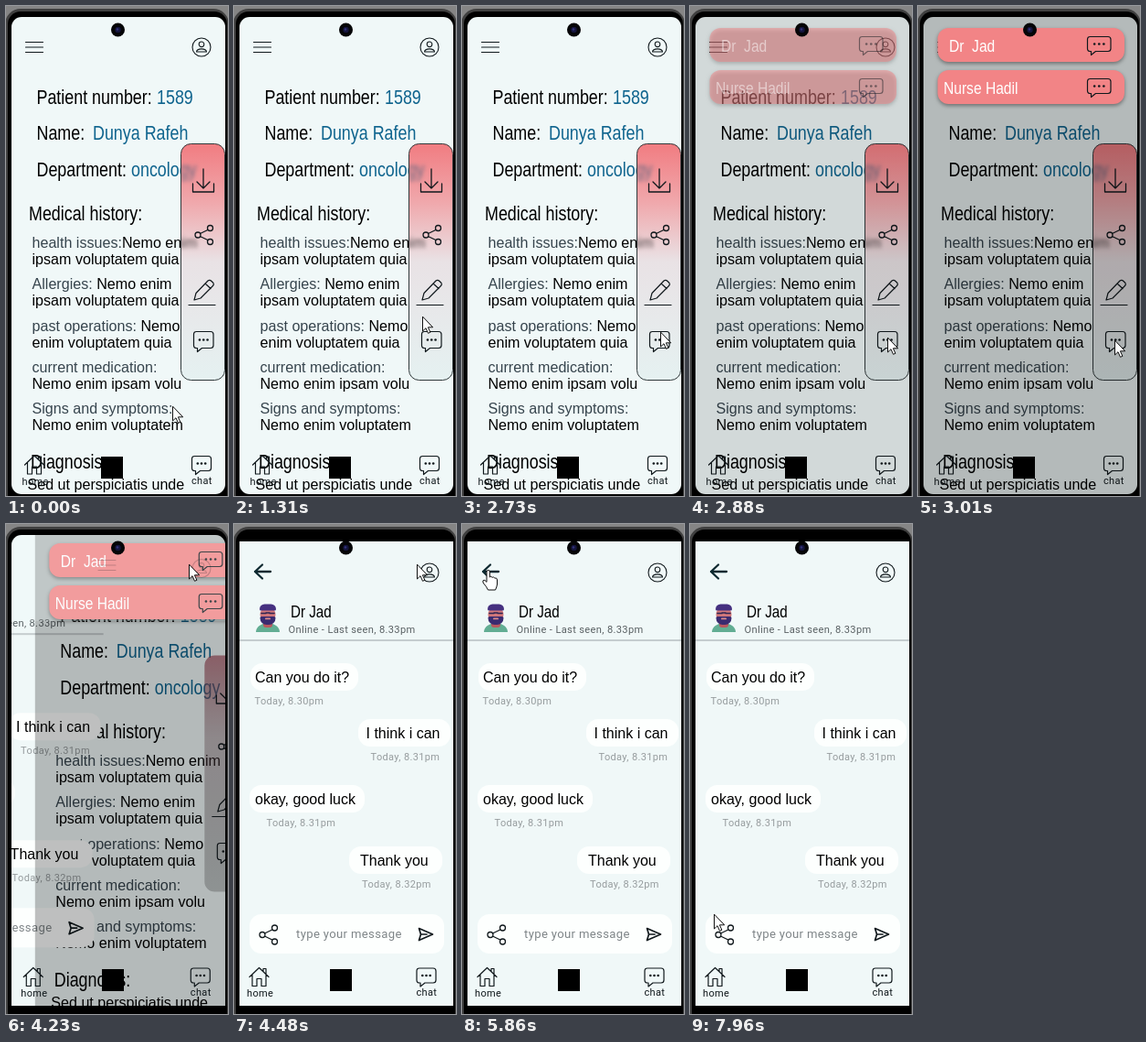
Animation, 243 px wide and 535 px high, one loop 8 s. Source, as an HTML page with a canvas:

```html
<!DOCTYPE html>
<html lang="en">
<head>
<meta charset="utf-8">
<title>Patient record and chat</title>
<style>
  html, body { margin: 0; width: 100%; height: 100%; overflow: hidden; background: #858585; }
  canvas { display: block; }
</style>
</head>
<body>
<canvas id="stage" width="243" height="535"></canvas>
<script>
const ctx = document.getElementById('stage').getContext('2d');
const LOOP = 8000;
const BG = '#f0f8f8', INK = '#10181c', BLUE = '#0f648e', SLATE = '#36444d', GREY = '#969c9e', PINK = '#f28486';

const FACES = {
  body: { family: '"Liberation Sans", Arial, sans-serif', scale: 1, spacing: 0 },
  narrow: { family: '"Liberation Sans", Arial, sans-serif', scale: 0.82, spacing: 0 },
  light: { family: 'Roboto, sans-serif', scale: 1, spacing: 0.35 }
};

function text(str, x, y, size, color = '#000', face = 'body') {
  const f = FACES[face];
  ctx.save();
  ctx.translate(x, y);
  ctx.scale(f.scale, 1);
  ctx.font = `${size}px ${f.family}`;
  ctx.letterSpacing = f.spacing + 'px';
  ctx.fillStyle = color;
  ctx.fillText(str, 0, 0);
  ctx.restore();
}

function box(x, y, w, h, r, fill) {
  ctx.beginPath();
  ctx.roundRect(x, y, w, h, r);
  if (fill) { ctx.fillStyle = fill; ctx.fill(); }
}

function disc(x, y, rx, ry, fill) {
  ctx.beginPath();
  ctx.ellipse(x, y, rx, ry, 0, 0, Math.PI * 2);
  ctx.fillStyle = fill;
  ctx.fill();
}

function stroke(d, x = 0, y = 0, width = 1.3, color = INK, fill) {
  ctx.save();
  ctx.translate(x, y);
  const path = new Path2D(d);
  if (fill) { ctx.fillStyle = fill; ctx.fill(path); }
  ctx.strokeStyle = color;
  ctx.lineWidth = width;
  ctx.lineJoin = ctx.lineCap = 'round';
  ctx.stroke(path);
  ctx.restore();
}

function fade(y, h, ...stops) {
  const g = ctx.createLinearGradient(0, y, 0, y + h);
  stops.forEach(([at, color]) => g.addColorStop(at, color));
  return g;
}

// Icons
function speech(x, y, w, h) {
  const b = h - 4;
  stroke(`M3 0H${w - 3}Q${w} 0 ${w} 3V${b - 3}Q${w} ${b} ${w - 3} ${b}H9L4 ${h}V${b}H3Q0 ${b} 0 ${b - 3}V3Q0 0 3 0Z`, x, y, 1.2);
  for (const k of [-1, 0, 1]) disc(x + w / 2 + k * w * 0.2, y + b / 2, 1.3, 1.3, INK);
}

function share(x, y, rise) {
  const ring = (cx, cy) => `M${cx + 3} ${cy}A3 3 0 1 1 ${cx - 3} ${cy}A3 3 0 1 1 ${cx + 3} ${cy}`;
  const r = rise - 2;
  stroke(ring(-6.5, 0) + ring(7, -rise) + ring(7, rise) + `M-4 -1.5L4.3 ${-r}M-4 1.5L4.3 ${r}`, x, y);
}

function person(x, y) {
  stroke('M10 0A10 10 0 1 1 -10 0A10 10 0 1 1 10 0M2.8 -3.2A2.8 2.8 0 1 1 -2.8 -3.2A2.8 2.8 0 1 1 2.8 -3.2M-5.5 5C-5 0.8 5 0.8 5.5 5Z', x, y, 1.1);
}

function menu(x, y) {
  stroke('M0 0H19M0 5.5H19M0 11H19', x, y, 1.1);
}

function nav(dx, dy) {
  ctx.save();
  ctx.translate(dx, dy);
  stroke('M0 10L10.5 0L21 10M3 8V20H8V12H13V20H18V8M15 4V1H18V7', 17, 484.5, 1.2);
  text('home', 14, 516, 11, INK, 'light');
  speech(200, 485, 21, 20);
  text('chat', 199.5, 515, 11, INK, 'light');
  ctx.restore();
}

function badge(x, y) {
  ctx.fillStyle = '#000';
  ctx.fillRect(x, y, 24, 24);
}

// Record screen
const NOTES = [
  ['health issues:', 'Nemo enim', 'ipsam voluptatem quia'],
  ['Allergies:', ' Nemo enim', 'ipsam voluptatem quia'],
  ['past operations:', ' Nemo', 'enim voluptatem quia'],
  ['current medication:', '', 'Nemo enim ipsam volu'],
  ['Signs and symptoms:', '', 'Nemo enim voluptatem']
];

function record() {
  const head = (s, x, y, color) => text(s, x, y, 21.8, color, 'narrow');
  head('Patient number:', 33.5, 107);
  head('1589', 165, 107, BLUE);
  head('Name:', 33.5, 146);
  head('Dunya Rafeh', 95, 146, BLUE);
  head('Department:', 33.5, 186);
  head('oncology', 137, 186, BLUE);
  head('Medical history:', 25, 234);
  NOTES.forEach(([label, rest, second], i) => {
    const y = 264 + i * 45.3;
    text(label, 28.5, y, 16.1, SLATE);
    ctx.font = `16.1px ${FACES.body.family}`;
    text(rest, 28.5 + ctx.measureText(label).width, y, 16.1);
    text(second, 28.5, y + 18, 16.1);
  });
  head('Diagnosis:', 27, 505);
  text('Sed ut perspiciatis unde', 23.5, 528, 16.1);
}

function toolIcons() {
  stroke('M216 178V199M209 192L216 199L223 192M204.5 194V203H227.5V194');
  share(216.5, 250, 7.5);
  stroke('M200 326.5H229M206 321L208 313.5L221 300Q223 298.5 225 300.5L227 302.5Q228 304 226.5 305.5L213 319ZM218 303L224 308.5', 0, 0, 1.2);
  speech(205.5, 355.5, 21.5, 22);
}

function toolPanel() {
  box(191.5, 150.5, 48, 258, 11, fade(150, 258, [0, '#f17c81'], [0.25, '#f0a8ac'], [0.5, '#e9e2e5'], [1, '#e5f1f1']));
  ctx.save();
  ctx.clip();
  ctx.filter = 'blur(2px)';
  text('oncology', 137, 186, 21.8, '#4a607ccc', 'narrow');
  text('Nemo enim', 127, 264, 16.1, '#222c');
  ctx.restore();
  box(191.5, 150.5, 48, 258, 11);
  ctx.strokeStyle = '#30383a';
  ctx.lineWidth = 1;
  ctx.stroke();
  toolIcons();
}

// See-through panel shown while the screens slide
function ghostPanel() {
  box(191.5, 150.5, 48, 258, 11, fade(150, 258, [0, '#9c4050aa'], [0.35, '#70505866'], [1, '#30303044']));
  toolIcons();
}

function card(y, label, x) {
  ctx.save();
  ctx.shadowColor = '#0006';
  ctx.shadowBlur = 4;
  ctx.shadowOffsetY = 2;
  box(21.5, y, 204.5, 37, 12, PINK);
  ctx.restore();
  text(label, x, y + 25.5, 19, '#fff', 'narrow');
  speech(185.5, y + 9.5, 25.5, 20);
}

function contacts(dy) {
  card(24 + dy, 'Dr  Jad', 34);
  card(70 + dy, 'Nurse Hadil', 28);
}

function dim() {
  ctx.fillStyle = '#00000040';
  ctx.fillRect(6, 0, 234, 535);
}

// Chat screen
function message(x, y, w, str, tx, date, dx) {
  box(x, y, w, 30, 13, '#fdfffe');
  text(str, tx, y + 20.5, 16);
  text(date, dx, y + 45, 11, GREY, 'light');
}

function avatar() {
  disc(37, 118, 13, 10, '#62ad93');
  box(32, 104, 10, 9, 3, '#b9585f');
  disc(37, 99, 8.5, 9, '#d0777a');
  box(28, 87.5, 18, 7, [7, 7, 2, 2], '#453080');
  box(28.5, 101, 17, 9, [2, 2, 8, 8], '#3a2b70');
  box(34, 102.5, 6, 1.8, 1, '#d98b8c');
  stroke('M30 97.5H35M39 97.5H44M35 97H39', 0, 0, 1.6, '#2c2553');
}

function chat() {
  stroke('M40 52H23M31 44.5L23 52L31 59.5', 0, 0, 2.3, '#0d2930');
  ctx.save();
  ctx.beginPath();
  ctx.rect(22, 86, 30, 32);
  ctx.clip();
  avatar();
  ctx.restore();
  text('Dr Jad', 62, 102, 18.5, '#000', 'narrow');
  text('Online - Last seen, 8.33pm', 59.5, 119, 11.1, '#596063', 'light');
  ctx.fillStyle = '#c5cdcf';
  ctx.fillRect(6, 126, 234, 2);
  message(18, 152, 118, 'Can you do it?', 23, 'Today, 8.30pm', 22.5);
  message(136, 213, 101, 'I think i can', 144.5, 'Today, 8.31pm', 149.5);
  message(17, 285, 126, 'okay, good luck', 23, 'Today, 8.31pm', 35.5);
  message(126, 352, 102, 'Thank you', 138, 'Today, 8.32pm', 140);
  box(17, 426, 213, 43, 13, '#fdfffe');
  share(37.5, 448.5, 7.5);
  text('type your message', 68, 452, 13.1, '#7f8588', 'light');
  stroke('M202.5 441.5L217.5 448L202.5 454.5L204.5 448ZM204.5 448H211', 0, 0, 1.7);
}

// Phone
function inScreen(top, bottom, radius, draw) {
  ctx.save();
  box(6, top, 234, bottom - top, radius, BG);
  ctx.clip();
  draw();
  ctx.restore();
}

function layer(alpha, dx, dy, draw) {
  ctx.save();
  ctx.globalAlpha = alpha;
  ctx.translate(dx, dy);
  draw();
  ctx.restore();
}

function bezel() {
  ctx.fillStyle = '#858585';
  ctx.fillRect(0, 0, 243, 535);
  box(-1, 3, 245, 560, 17, '#404040');
  box(2, 6, 240, 560, 14, '#000');
}

function camera() {
  disc(122.5, 26, 7.5, 7.5, '#050507');
  disc(122.5, 26, 3.2, 3.2, '#15153c');
  disc(122, 25.5, 1.3, 1.3, '#32327a');
}

function recordScreen(open) {
  inScreen(12, 533, 11, () => {
    menu(21.5, 39.5);
    person(214, 45);
    record();
    toolPanel();
    nav(3.5, 6.5);
    badge(104, 492);
    if (open) layer(open, 0, 0, () => { dim(); contacts(0); });
  });
}

function slideScreen(p) {
  const left = 1 - p, alpha = Math.min(1, 2 * left), shift = 60 * p;
  inScreen(12, 526, [11, 11, 0, 0], () => {
    layer(alpha, shift, 0, record);
    layer(1, -234 * left, -12 * left, chat);
    layer(alpha, shift, -7, ghostPanel);
    layer(alpha, shift, 0, () => { dim(); contacts(-3); });
    ctx.fillStyle = '#f0f8f833';
    ctx.fillRect(6, 12, 234, 94);
    layer(0.22, 0, 0, () => menu(101, 39.5));
    layer(Math.max(0.22, 1 - alpha), 0, 0, () => person(214, 45 + 8 * p));
    nav(4 * left, 0);
    badge(105, 486);
  });
}

function chatScreen() {
  inScreen(19, 526, 0, () => {
    chat();
    person(214, 53);
    nav(0, 0);
    badge(105, 486);
  });
}

// Pointer: time, x, y; no position means hidden
const POINTER = [
  [0, 182, 437], [120, 190, 412], [240, 207, 372], [360],
  [640, 231, 178], [760, 222, 183], [880, 214, 189], [1050, 206, 273],
  [1190, 206, 310], [1310, 206, 339], [1450, 209, 356], [1570, 212, 367],
  [1710, 212, 369], [1960, 217, 361], [2080, 222, 353], [2330, 217, 353],
  [2730, 217, 356], [2880, 216, 362], [3010, 215, 365], [3290, 182, 303],
  [3440, 139, 93], [3590, 197, 56], [3740, 194, 50], [3860, 200, 44],
  [5030, 160, 44], [5150, 113, 44], [5300, 61, 44], [5450, 43, 44],
  [5740, 28, 46], [5860, 22, 50], [7440, 27, 54], [7560, 26, 150],
  [7690, 24, 289], [7840, 24, 370], [7960, 26, 426]
];
const ARROW = 'M.5 .5V16L4 12.7L6.5 18.3L8.9 17.3L6.4 11.8H11.3Z';
const HAND = 'M5 13V2Q5 .5 6.7 .5T8.4 2V8Q9.5 6.5 11.2 8.3Q12.5 7.3 13.8 9Q16.5 8.5 16.5 11V16Q16 19 14.5 22H6.5Q5 18.5 1 14Q0 11 2.5 11.3Z';

function pointer(t) {
  const [start, x, y] = POINTER.findLast(k => k[0] <= t);
  if (x === undefined) return;
  stroke(start === 5860 ? HAND : ARROW, x, y, 1, '#111', '#fff');
}

function render(t) {
  bezel();
  if (t < 2880) recordScreen(0);
  else if (t < 3010) recordScreen(0.5);
  else if (t < 4230) recordScreen(1);
  else if (t < 4350) slideScreen(0.43);
  else if (t < 4480) slideScreen(0.86);
  else chatScreen();
  camera();
  pointer(t);
}

const begin = performance.now();
function tick() {
  render((performance.now() - begin) % LOOP);
  requestAnimationFrame(tick);
}
tick();
</script>
</body>
</html>
```
